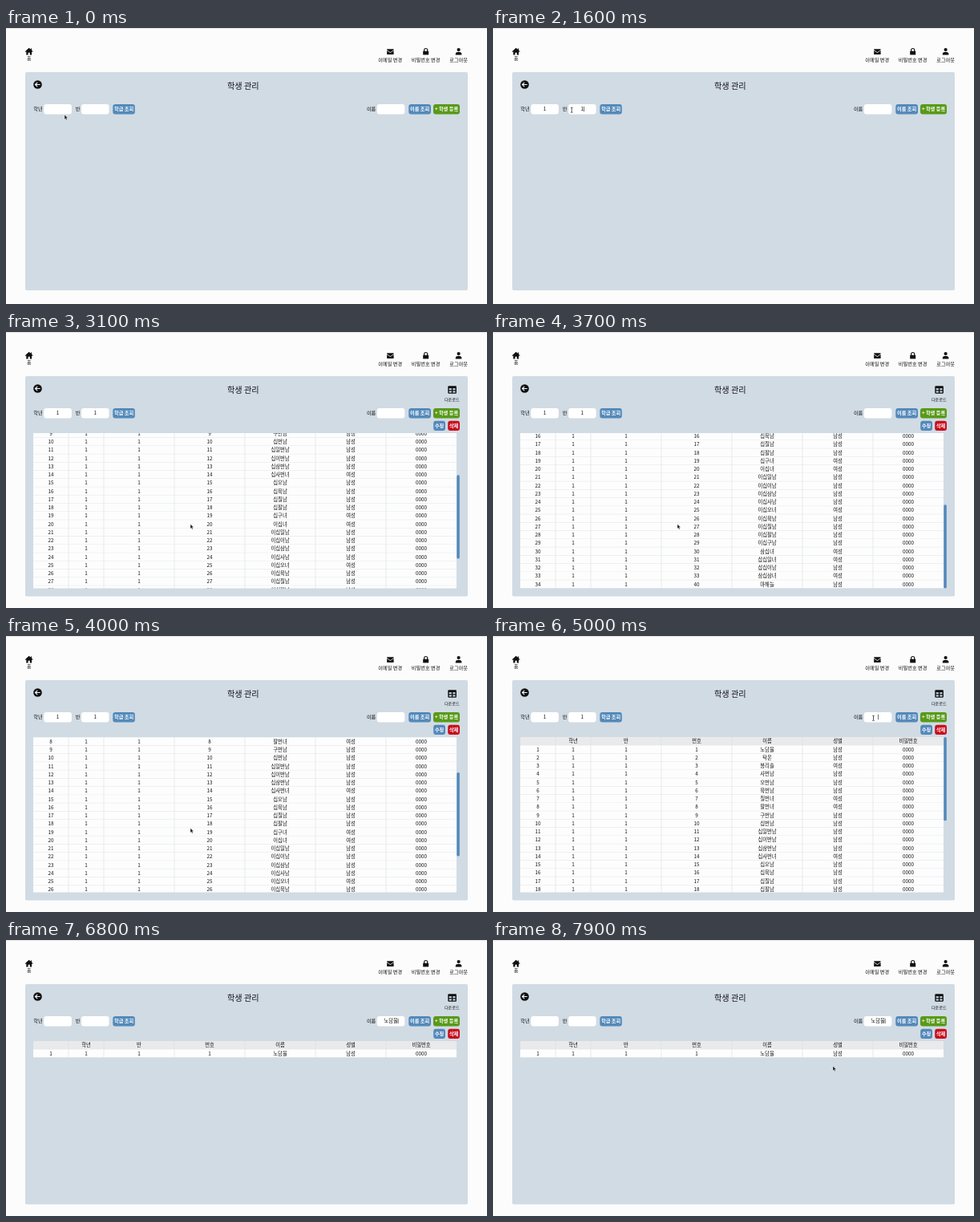
Animation of 600x344 px, one loop 8 s. Source, as an HTML page:

```html
<!DOCTYPE html>
<html>
<head>
<meta charset="utf-8">
<style>
  html, body { margin: 0; width: 100%; height: 100%; overflow: hidden; background: #fcfcfc; }
  svg { display: block; }
  text { font-family: "Noto Sans CJK KR", "Noto Sans CJK", "Noto Sans", sans-serif; font-weight: 500; text-anchor: middle; fill: #111; }
  text.light { fill: #fff; font-weight: 700; }
</style>
</head>
<body>
<svg id="stage" width="600" height="344" viewBox="0 0 600 344"></svg>
<script>
const LOOP = 8000, STEP = 100;
const ROW = 10.25, TOP = 126, VIEW = 193.5, COUNT = 34;
const CONTENT = ROW * (COUNT + 1), MAX_SCROLL = CONTENT - VIEW;
const COLS = [34, 78, 122, 210, 298, 386, 474, 562];
const SEARCHED = '노담율';
const TYPING = ['ㄴ', '노', '녿', '노다', '노담', '노담ㅇ', '노담유', SEARCHED];

const $ = id => document.getElementById(id);
const text = (x, y, s, size = 6.3, extra = '') =>
  `<text x="${x}" y="${y + size * 0.37}" font-size="${size}" ${extra}>${s}</text>`;
const box = (x, y, w, h, fill, r = 0, extra = '') =>
  `<rect x="${x}" y="${y}" width="${w}" height="${h}" rx="${r}" fill="${fill}" ${extra}/>`;
const button = (x, y, w, label, fill, id = '') =>
  box(x, y, w, 12.4, fill, 3, id && `id="${id}"`) + text(x + w / 2, y + 6, label, 6.2, 'class="light"');
const input = (x, id) => box(x, 95, 34.6, 12.5, '#fff', 3) + text(x + 17.3, 101, '', 6.3, `id="${id}"`);

// Students: most names spell out their number plus a gender suffix
const DIGITS = ['', '일', '이', '삼', '사', '오', '육', '칠', '팔', '구'];
const FEMALE = [3, 7, 8, 14, 19, 20, 25, 30, 31, 33];
const NAMED = { 1: SEARCHED, 2: '탁온', 3: '봉리솔', 34: '마해늘' };
function studentName(n) {
  if (NAMED[n]) return NAMED[n];
  const tens = n > 30 && n < 33 ? '삽' : n > 19 ? DIGITS[n / 10 | 0] : '';
  return tens + (n > 9 ? '십' : '') + DIGITS[n % 10] +
    (n < 15 ? '번' : '') + (FEMALE.includes(n) ? '녀' : '남');
}
function tableRow(i) {
  const cells = i
    ? [i, 1, 1, i === COUNT ? 40 : i, studentName(i), FEMALE.includes(i) ? '여성' : '남성', '0000']
    : ['', '학년', '반', '번호', '이름', '성별', '비밀번호'];
  const y = TOP + i * ROW;
  return box(34, y, 528, ROW, i ? '#fdfdfd' : '#e9eaeb') +
    cells.map((c, k) => text((COLS[k] + COLS[k + 1]) / 2, y + 5.1, c)).join('') +
    `<path d="M34 ${y + ROW}H562${COLS.slice(1, -1).map(x => `M${x} ${y}v${ROW}`).join('')}" stroke="#dcdddf" stroke-width=".6"/>`;
}
const rows = Array.from({ length: COUNT + 1 }, (_, i) => tableRow(i));

$('stage').innerHTML = `
  <clipPath id="view">${box(34, TOP, 528, VIEW, '#fff')}</clipPath>
  ${box(0, 0, 600, 344, '#fcfcfc')}${box(0, 0, 600, 1, '#e2e2e2')}
  <g fill="#111">
    <path d="M28.7 24.8 23.8 29.2l.6.7.9-.7v4.3h2.3v-2.8h2.2v2.8h2.3v-4.3l.9.7.6-.7-1.5-1.4v-2.3h-1.2v1.2z"/>
    <path d="M475.2 26.2h8.4v1l-4.2 3-4.2-3zM475.2 28.1l4.2 3 4.2-3v4.9h-8.4z"/>
    <path d="M520.2 28.8h7v4.6h-7z"/>
    <path d="M521.7 29v-1.5a2 2 0 0 1 4 0V29" fill="none" stroke="#111" stroke-width="1.2"/>
    <circle cx="564.6" cy="27.1" r="2.1"/>
    <path d="M560.8 33.6v-1a2.6 2.6 0 0 1 2.6-2.6h2.4a2.6 2.6 0 0 1 2.6 2.6v1z"/>
  </g>
  ${text(28.7, 38, '홈', 6.1)}${text(479.3, 40, '이메일 변경', 6.2)}
  ${text(523.6, 40, '비밀번호 변경', 6.2)}${text(564.7, 40, '로그아웃', 6.2)}
  ${box(24, 55, 552, 272, '#d1dbe4', 2, 'id="panel"')}
  <circle cx="39.5" cy="70.5" r="5.3" fill="#111"/>
  <path d="M42.6 70.5h-6M39.2 67.8l-2.7 2.7 2.7 2.7" fill="none" stroke="#fff" stroke-width="1.1"/>
  ${text(295.8, 72, '학생 관리', 10.2)}
  ${text(40, 101, '학년', 6.2)}${input(47.3, 'grade')}
  ${text(89.5, 101, '반', 6.2)}${input(94, 'room')}
  ${button(133.3, 95, 27.5, '학급 조회', '#5389ba', 'search')}
  ${text(455.6, 101, '이름', 6.2)}${input(462.8, 'name')}
  ${button(502.3, 95, 27.7, '이름 조회', '#5389ba')}
  ${button(533, 95, 33, '+ 학생 등록', '#589a18')}
  <path id="compose" stroke="#111" stroke-width=".6"/>
  <path id="caret" stroke="#111" stroke-width=".6"/>
  <g id="results">
    ${box(551.3, 67.3, 10.6, 9.4, '#111', 1.2)}
    <path d="M552.7 70.3h3.2v2h-3.2zM557.3 70.3h3.2v2h-3.2zM552.7 73.4h3.2v2h-3.2zM557.3 73.4h3.2v2h-3.2z" fill="#d1dbe4"/>
    ${text(556.3, 84.2, '다운로드', 5.1)}
    ${button(533.2, 110.7, 14.8, '수정', '#5389ba')}${button(551.2, 110.7, 14.8, '삭제', '#c8101f')}
    <g clip-path="url(#view)"><g id="table"></g></g>
    ${box(562.3, TOP, 3.5, VIEW * VIEW / CONTENT, '#5389ba', 1.7, 'id="thumb"')}
  </g>
  <g id="cursor" stroke-linejoin="round">
    <path id="arrow" d="M0 0v5.6l1.3-1.2.9 2 1-.5-.9-1.9h1.8z" fill="#111" stroke="#fff" stroke-width=".4"/>
    <path id="beam" d="M-1.2-3.2Q0-3.2 0-2.4 0-3.2 1.2-3.2M0-2.4V2.4M-1.2 3.2Q0 3.2 0 2.4 0 3.2 1.2 3.2" fill="none" stroke="#111" stroke-width=".7"/>
    <path id="hand" d="M-.6-.5Q0-1.2.6-.5V1.8l2.4.7q.6.2.5.9L3 6H-.2L-2 3.3q-.2-.8.5-.7l.9.7z" fill="#fff" stroke="#111" stroke-width=".6"/>
  </g>`;

const PATH = [
  [0, 73, 108.3], [300, 65, 101.5], [1400, 65, 101.5], [1900, 148, 103.2], [2300, 148, 103.2],
  [2500, 230, 239.6], [4500, 230, 239.6], [4900, 474.5, 102.3], [6900, 474.5, 102.3],
  [7700, 424, 157.3], [LOOP, 424, 157.3]
];
function cursorAt(t) {
  const k = PATH.findIndex(p => p[0] > t), [t0, x0, y0] = PATH[k - 1], [t1, x1, y1] = PATH[k];
  const u = (t - t0) / (t1 - t0);
  return [x0 + (x1 - x0) * u, y0 + (y1 - y0) * u];
}
const glide = (t, from, to) => 1 - (1 - Math.min(1, Math.max(0, (t - from) / (to - from)))) ** 1.5;
const between = (t, a, b) => t >= a && t < b;
const show = (id, on) => $(id).setAttribute('display', on ? 'inline' : 'none');

let shownRows = 0;
function setRows(n) {
  if (n === shownRows) return;
  shownRows = n;
  $('table').innerHTML = rows.slice(0, n + 1).join('');
}

function draw(t) {
  const found = t >= 6700, listed = t >= 1800;
  show('results', listed);
  $('panel').setAttribute('height', listed ? 274.6 : 272);
  setRows(found ? 1 : COUNT);
  const scroll = MAX_SCROLL * (glide(t, 2700, 3600) - glide(t, 3700, 4500));
  $('table').setAttribute('transform', `translate(0 ${-scroll})`);
  $('thumb').setAttribute('y', TOP + scroll * VIEW / CONTENT);
  show('thumb', !found);

  const typed = TYPING[Math.min(TYPING.length - 1, Math.floor((t - 5500) / STEP))] || '';
  $('grade').textContent = between(t, 600, 6700) ? '1' : '';
  $('room').textContent = between(t, 1300, 6700) ? '1' : '';
  $('name').textContent = typed;

  const focus = between(t, 300, 1000) ? 'grade' : between(t, 1000, 1800) ? 'room' : t >= 4900 ? 'name' : '';
  show('caret', focus);
  if (focus) {
    const field = $(focus), end = +field.getAttribute('x') + field.getComputedTextLength() / 2 + 0.4;
    $('caret').setAttribute('d', `M${end} 97.8v6.4`);
    $('compose').setAttribute('d', `M${end - 6} 104.3h5.6`);
  }
  show('compose', typed && !found);

  const [x, y] = cursorAt(t);
  const inBar = between(y, 95, 107.5);
  const onInput = inBar && [47.3, 94, 462.8].some(left => between(x, left, left + 34.6));
  const onSearch = inBar && between(x, 133.3, 160.8);
  $('cursor').setAttribute('transform', `translate(${x} ${y})`);
  show('cursor', !between(t, 600, 1500) && !between(t, 5500, 7000));
  show('beam', onInput);
  show('hand', onSearch);
  show('arrow', !onInput && !onSearch);
  $('search').setAttribute('fill', onSearch ? '#0b1663' : '#5389ba');
}

const start = performance.now();
function tick() {
  const t = (performance.now() - start) % LOOP;
  draw(Math.floor(t / STEP) * STEP);
  requestAnimationFrame(tick);
}
tick();
</script>
</body>
</html>
```
